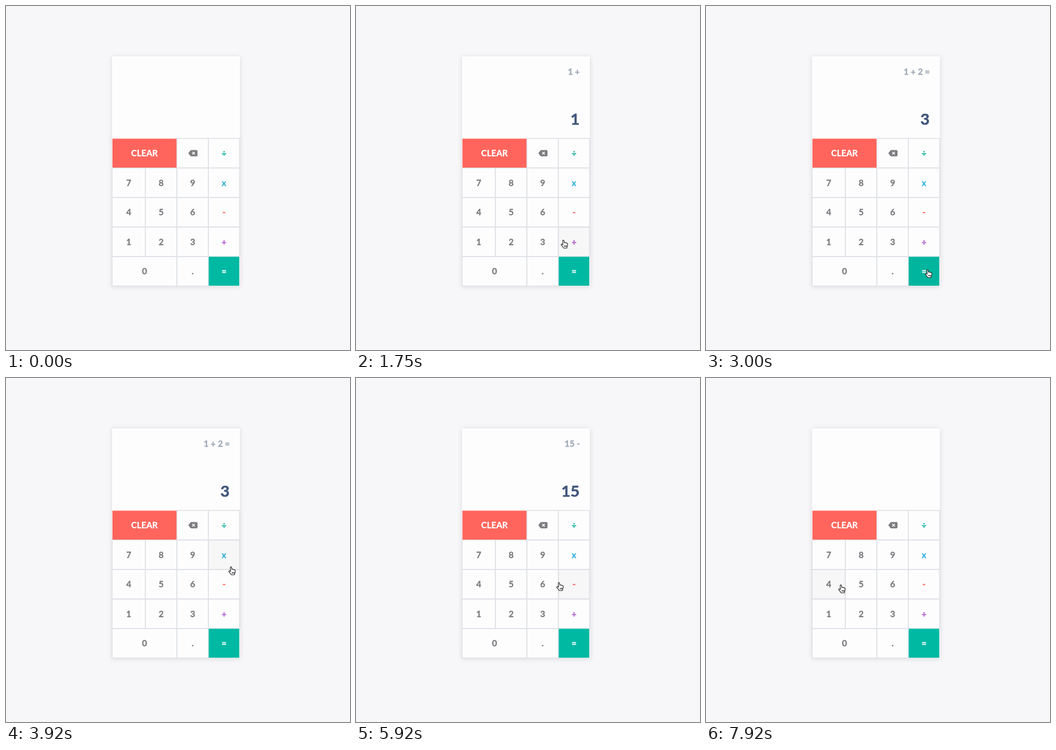
Recreate the animation shown at these times as an HTML page. Size 600 by 600 pixels, loop 8 s.

```html
<!DOCTYPE html>
<html lang="en">
<head>
<meta charset="utf-8">
<title>Calculator</title>
<style>
  html, body { margin: 0; width: 100%; height: 100%; overflow: hidden; background: #f7f6f9; }
  svg { display: block; width: 100vw; height: 100vh; }
  text { font: 700 15px Lato, sans-serif; text-anchor: middle; fill: currentColor; stroke: currentColor; stroke-width: .3; }
  .panel { fill: #fefdfe; filter: drop-shadow(0 1px 4px rgba(0, 0, 0, .12)); }
  .outline { fill: none; stroke: #e1e3e8; stroke-width: 1.7; }
  #expression { color: #9ca7b4; text-anchor: end; }
  #display { color: #41567a; font-size: 27.5px; stroke-width: .6; text-anchor: end; }
</style>
</head>
<body>
<svg viewBox="0 0 600 600">
  <rect class="panel" x="185" y="88" width="223" height="400.5"/>
  <text id="expression" x="390.5" y="120"></text>
  <text id="display" x="390" y="206.5"></text>
  <g id="keys"></g>
  <path d="M318 256.8L321.6 252Q322.3 251.2 323.3 251.2H332.2Q334 251.2 334 253V260.4Q334 262.2 332.2 262.2H323.3Q322.3 262.2 321.6 261.5Z" fill="#7c7c80"/>
  <path d="M324.8 254.4l4.6 4.6m0-4.6l-4.6 4.6" stroke="#fff" stroke-width="1.4"/>
  <rect id="shade"/>
  <path id="hand" d="M-3-5.5C-3-7.4-.7-7.4-.6-5.5L-.4-2.5C.4-3.3 1.6-3 1.8-2.1C2.6-2.8 3.6-2.4 3.8-1.5C5-2 5.7-1.2 5.7 0C5.7 3 4.4 4 4.3 7H-1.5C-1.8 5.2-4.2 3.6-5.5 1.4C-6-.2-4.2-.7-2.5 1.2ZM.2 2.5v2.2M1.9 2.5v2.2M3.5 2.5v2.2"
    fill="#fff" stroke="#222" stroke-width="1.1" stroke-linejoin="round"/>
</svg>
<script>
const cols = [185, 243, 298, 353, 407.5];
const rowY = row => 231 + 51.5 * row;
const byId = id => document.getElementById(id);
const keys = {};

function rectangle(x, y, w, h, attributes) {
  return `<rect x="${x}" y="${y}" width="${w}" height="${h}" ${attributes}/>`;
}

function addKey(label, row, col, { span = 1, color = '#79797d', fill } = {}) {
  const x = cols[col], y = rowY(row), w = cols[col + span] - x, h = rowY(1) - rowY(0);
  const cx = x + w / 2, cy = y + h / 2;
  keys[label] = { x, y, w, h, cx, cy };
  byId('keys').innerHTML +=
    (fill ? rectangle(x + .6, y + .4, w - 1.2, h - 1, `fill="${fill}"`)
          : rectangle(x, y, w, h, 'class="outline"')) +
    `<text x="${cx}" y="${cy + 5.5}" color="${color}">${label}</text>`;
}

addKey('', 0, 2);
addKey('÷', 0, 3, { color: '#19b5a0' });
['789', '456', '123'].forEach((digits, i) => {
  [...digits].forEach((digit, col) => addKey(digit, i + 1, col));
  addKey('x-+'[i], i + 1, 3, { color: ['#35b2dc', '#ff6a60', '#b468d0'][i] });
});
addKey('0', 4, 0, { span: 2 });
addKey('.', 4, 2);
addKey('CLEAR', 0, 0, { span: 2, color: '#fff', fill: '#ff655c' });
addKey('=', 4, 3, { color: '#fff', fill: '#00b9a2' });

// The pointer travels to each key, rests on it, then clicks unless it only hovers.
const travel = 260, rest = 150, pressTime = 85, entry = 570;
const start = { x: 430, y: 519 };
const visits = [
  { key: '1', time: 1160, aim: [6, -8] },
  { key: '+', time: 1660 },
  { key: '2', time: 2080 },
  { key: '÷', time: 2570, aim: [16, 16], hover: true },
  { key: '=', time: 2980 },
  { key: 'x', time: 4040, aim: [14, 28] },
  { key: '5', time: 4500 },
  { key: '=', time: 5077 },
  { key: '-', time: 5790 },
  { key: '5', time: 6233 },
  { key: '=', time: 6660 },
  { key: 'CLEAR', time: 7400 },
  { key: '4', time: 8060, aim: [23, 8], hover: true }
];
const clicks = visits.filter(visit => !visit.hover);

function pointerAt(t) {
  let { x, y } = start;
  for (const { key, time, aim = [8, 4] } of visits) {
    const u = Math.min(1, Math.max(0, (t - time + rest + travel) / travel));
    const ease = u * u * (3 - 2 * u);
    x += (keys[key].cx + aim[0] - x) * ease;
    y += (keys[key].cy + aim[1] - y) * ease;
  }
  return { x, y };
}

const operations = {
  '+': (a, b) => a + b, '-': (a, b) => a - b,
  'x': (a, b) => a * b, '÷': (a, b) => a / b
};

function calculate(pressedKeys) {
  let expression = '', display = '', fresh = true;
  for (const key of pressedKeys) {
    if (key === 'CLEAR') {
      expression = display = '';
    } else if (key === '=') {
      const [a, operator] = expression.split(' ');
      expression += ` ${display} =`;
      display = String(operations[operator](+a, +display));
    } else if (key in operations) {
      expression = `${display} ${key}`;
    } else {
      display = fresh ? key : display + key;
    }
    fresh = !/\d/.test(key);
  }
  return { expression, display };
}

function draw() {
  // Motion advances at 12 pictures per second.
  const t = Math.floor((performance.now() % 8000 + 4) * .012) / .012;
  const { expression, display } = calculate(clicks.filter(c => c.time <= t).map(c => c.key));
  byId('expression').textContent = expression;
  byId('display').textContent = display;

  const visible = t > entry;
  const { x, y } = pointerAt(t);
  byId('hand').setAttribute('transform', `translate(${x} ${y})`);
  byId('hand').style.display = visible ? '' : 'none';

  // Hover feedback trails the fingertip slightly.
  const trail = pointerAt(t - 50), tipX = trail.x - 1, tipY = trail.y - 6;
  const key = visible && Object.values(keys).find(k =>
    tipX >= k.x && tipX < k.x + k.w && tipY >= k.y && tipY < k.y + k.h);
  const pressed = clicks.some(c => t < c.time && t >= c.time - pressTime);
  byId('shade').style.display = key ? '' : 'none';
  if (key) {
    for (const [name, value] of Object.entries({
      x: key.x, y: key.y, width: key.w, height: key.h, opacity: pressed ? .13 : .025
    })) byId('shade').setAttribute(name, value);
  }
  requestAnimationFrame(draw);
}
draw();
</script>
</body>
</html>
```
